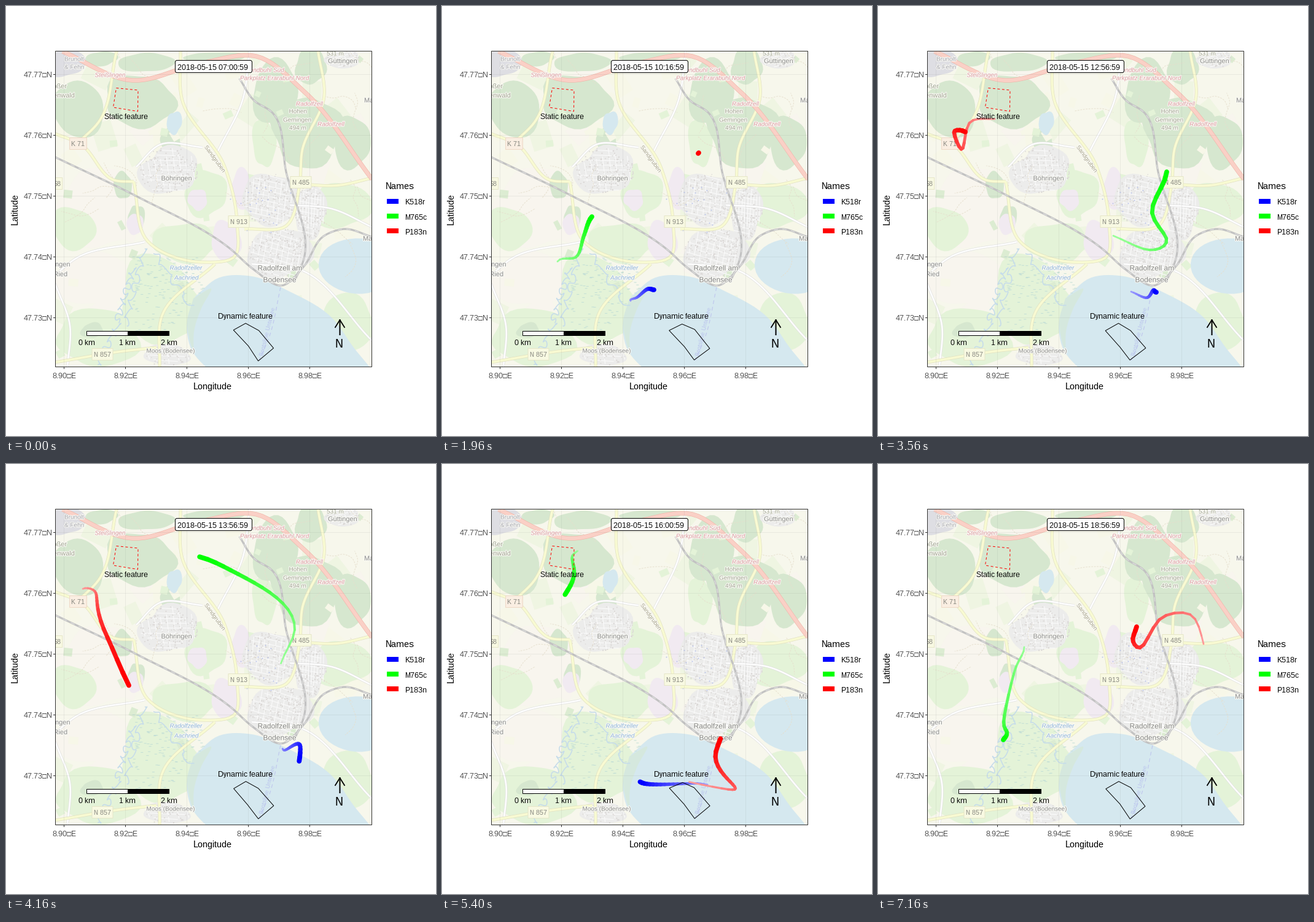
These frames come from a looping animation (700x700 px, 7200 ms). A matplotlib script:

```python
import numpy as np
import matplotlib.pyplot as plt
from matplotlib.animation import FuncAnimation
from matplotlib.collections import LineCollection, PolyCollection
from matplotlib.patches import FancyBboxPatch, Polygon, Rectangle
from matplotlib.patheffects import withStroke

FRAMES, STEP_MS, TAIL = 180, 40, 19
PT = 0.72  # points per pixel at 100 dpi
L, T, R, B = 80.5, 73.5, 595.5, 587.5
rng = np.random.default_rng(7)

plt.rcParams.update({"font.family": "Liberation Sans", "path.snap": False,
                     "text.hinting": "native", "text.hinting_factor": 1})
fig = plt.figure(figsize=(7, 7), dpi=100, facecolor="white")
chart = fig.add_axes([L / 700, 1 - B / 700, (R - L) / 700, (B - T) / 700],
                     xlim=(L, R), ylim=(B, T), xticks=[], yticks=[], facecolor="#f7f7ec")
ax = fig.add_axes([0, 0, 1, 1], xlim=(0, 700), ylim=(700, 0))
ax.axis("off")
for side in chart.spines.values():
    side.set_visible(False)


def hermite(t, p, s):
    """Smooth path through points p at times t, sampled at s."""
    m = np.gradient(p, t, axis=0)
    i = np.clip(np.searchsorted(t, s, "right") - 1, 0, len(t) - 2)
    h = (t[i + 1] - t[i])[:, None]
    u = (s - t[i])[:, None] / h
    v = 1 - u
    return v * v * ((1 + 2 * u) * p[i] + u * h * m[i]) + u * u * ((3 - 2 * u) * p[i + 1] - v * h * m[i + 1])


def curve(*flat):
    p = np.array(flat, float).reshape(-1, 2)
    t = np.r_[0, np.cumsum(np.hypot(*np.diff(p, axis=0).T))]
    return hermite(t, p, np.linspace(0, t[-1], 10 * len(p)))


areas, fills = [], []


def area(color, shape):
    areas.append(shape)
    fills.append(color)


def blob(color, cx, cy, rx, ry, rough=.12):
    a = np.linspace(0, 2 * np.pi, 40)
    r = 1 + sum(rough * rng.uniform(.3, 1) / k ** .5 * np.cos((k + 1) * a + rng.uniform(0, 6)) for k in (1, 2, 4))
    area(color, np.stack([cx + rx * r * np.cos(a), cy + ry * r * np.sin(a)], 1))


def lines(paths, color, width, z, **kw):
    chart.add_collection(LineCollection(paths, colors=color, linewidths=width * PT, zorder=z, **kw),
                         autolim=False)


def label(a, x, y, s, size=12, color="black", ha="center", **kw):
    return a.text(x, y + .36 * size, s, size=size * PT, color=color, ha=ha, va="baseline", **kw)


def place(x, y, s, size=11, color="#8c8c8c", angle=0, **kw):
    chart.text(x, y, s, size=size * PT, color=color, ha="center", va="center", rotation=angle,
               rotation_mode="anchor", clip_on=True, zorder=4,
               path_effects=[withStroke(linewidth=1.6, foreground="#fafaf5")], **kw)


FOREST, MEADOW, CREAM, PALE = "#d6e7cf", "#e4f3d8", "#f7f7e8", "#f8f5ee"
TOWN, WORKS, WATER, SCRUB = "#ececeb", "#f1eaf1", "#d5e8ef", "#dcecd2"


def parcels(n, colors, size):
    """Small tilted fields scattered over the land."""
    for _ in range(n):
        c, d = rng.uniform((L, T), (R, B)), rng.uniform(.4, 1, 2) * size
        a = rng.uniform(0, 1.5)
        u, v = d[0] * np.array([np.cos(a), np.sin(a)]), d[1] * np.array([-np.sin(a), np.cos(a)])
        area(colors[rng.integers(len(colors))], np.array([c + u + v, c + u - v, c - u - v, c - u + v]))


parcels(50, (CREAM, PALE, "#eff5e2"), 24)
blob(PALE, 150, 330, 65, 70)
blob(PALE, 145, 445, 60, 45)
for spot in [(110, 362, 36, 34), (250, 480, 65, 70), (150, 540, 70, 45), (325, 305, 36, 36),
             (290, 385, 55, 30), (545, 325, 48, 38), (420, 222, 18, 42), (555, 515, 45, 45)]:
    blob(MEADOW, *spot)
for spot in [(118, 168, 42, 46), (218, 155, 58, 42), (155, 86, 26, 12), (228, 92, 44, 16), (340, 84, 50, 9),
             (438, 140, 38, 50), (490, 205, 55, 60), (563, 222, 32, 40), (496, 98, 25, 30),
             (268, 220, 17, 20), (190, 292, 15, 22), (212, 345, 13, 22), (140, 528, 18, 12)]:
    blob(FOREST, *spot)
parcels(30, (CREAM, MEADOW, SCRUB), 9)
blob("#dedee3", 98, 92, 30, 24)
for spot in [(358, 382, 24, 32), (383, 298, 16, 32), (312, 315, 16, 17), (210, 355, 13, 18)]:
    blob(WORKS, *spot)
TOWNS = [(265, 268, 48, 38), (432, 315, 48, 42), (495, 335, 26, 44), (445, 402, 50, 42),
         (548, 86, 28, 16), (262, 568, 36, 18)]
for town in TOWNS:
    blob(TOWN, *town)

# Lakes, with reeds along the west shore
area(WATER, curve(308, 473, 345, 443, 400, 440, 460, 464, 530, 507, 566, 556, 600, 600,
                  340, 600, 300, 555, 295, 512, 308, 473))
area("#d5e8de", curve(305, 476, 334, 460, 318, 492, 306, 530, 305, 560, 295, 515, 305, 476))
blob(WATER, 572, 423, 63, 45, .02)
blob(WATER, 274, 190, 12, 19)
chart.add_collection(PolyCollection(areas, facecolors=fills, edgecolors="none", zorder=1), autolim=False)

# Side streets and houses
alleys, houses = [], []
for cx, cy, rx, ry in TOWNS:
    tilt = rng.uniform(-.4, .4)
    turn = np.array([[np.cos(tilt), np.sin(tilt)], [-np.sin(tilt), np.cos(tilt)]])
    for k in np.arange(-.9, .91, 8 / ry):
        w = np.sqrt(1 - k * k) * rng.uniform(.5, 1, 2)
        alleys += [np.array([[k * rx, -w[0] * ry], [k * rx + 4, w[1] * ry]]) @ turn + (cx, cy),
                   np.array([[-w[0] * rx, k * ry], [w[1] * rx, k * ry + 3]]) @ turn + (cx, cy)]
    n = int(rx * ry / 12)
    r, a = np.sqrt(rng.random(n)), rng.uniform(0, 2 * np.pi, n)
    houses.append(np.stack([cx + r * rx * np.cos(a), cy + r * ry * np.sin(a)], 1))
houses = np.vstack(houses)
lines(alleys, "#fafafa", 1.2, 1.2)
chart.scatter(*houses.T, s=rng.uniform(.8, 2.5, len(houses)), marker="s", c="#dbd8d6", lw=0, zorder=1.3)
chart.scatter(rng.normal(425, 28, 22), rng.normal(320, 24, 22), s=2, c="#b9c3ea", lw=0, zorder=1.4)

# Marsh ticks, creeks and footpaths
reeds = np.stack([rng.uniform(205, 325, 170), rng.uniform(408, 530, 170)], 1)
reeds = reeds[reeds.sum(1) < 790]
lines([[(x, y), (x + 4, y)] for x, y in reeds], "#c3dfd6", 1, 1.4)
u = np.linspace(0, 1, 90)
lines([np.stack([x + dx * u + 5 * np.sin(f * u), y + dy * u + 3 * np.cos(1.7 * f * u)], 1)
       for x, y, dx, dy, f in [(226, 392, -32, 128, 34), (208, 425, -28, 90, 40),
                               (184, 515, -36, 72, 28), (240, 400, 62, 90, 20)]], "#c6dcea", 1.6, 1.4)
paths = []
for _ in range(22):
    a = rng.uniform(0, 6.3) + np.cumsum(rng.normal(0, .5, 5))
    paths.append(curve(*(rng.uniform((L, T), (R, 400)) + 16 * np.cumsum(np.stack([np.cos(a), np.sin(a)], 1), 0)).ravel()))
lines(paths, "#e6dfcd", .9, 1.5, linestyles=(0, (3, 2)))

# Roads and railways
minor = [curve(80, 438, 112, 412, 226, 384), curve(80, 452, 104, 520, 100, 588),
         curve(396, 74, 386, 150, 345, 236), curve(320, 230, 250, 226, 212, 262),
         curve(462, 324, 530, 330, 596, 360), curve(400, 420, 475, 428, 596, 545)]
major = [curve(284, 74, 286, 150, 356, 262, 376, 352, 372, 408, 320, 417, 230, 382, 208, 286),
         curve(80, 208, 120, 224, 178, 284, 208, 286), curve(118, 222, 150, 190, 180, 74),
         curve(340, 420, 254, 504, 250, 588),
         curve(388, 363, 456, 358, 478, 290, 482, 236, 518, 146, 508, 74),
         curve(80, 580, 190, 562, 245, 556), curve(596, 280, 540, 292, 478, 290)]
motorway = [curve(92, 74, 205, 121, 318, 93, 408, 82, 486, 140, 596, 282)]
for roads, edge, fill, w, z in [(minor, "#dedede", "#fefefe", 2.6, 2), (major, "#e0dfbf", "#f8fad2", 3.8, 2.1),
                                (motorway, "#efb5a8", "#fad0c6", 6, 2.2)]:
    lines(roads, edge, w + 1.2, z)
    lines(roads, fill, w, z)
rails = [curve(80, 246, 215, 311, 366, 396, 402, 428, 450, 455, 484, 425, 518, 374, 550, 363, 596, 376),
         curve(380, 118, 404, 154, 432, 172, 456, 270, 484, 415, 470, 447)]
lines(rails, "#c2c2c2", 3.2, 2.3)
lines(rails, "#dcdcdc", 1.4, 2.4, linestyles=(0, (5, 5)))
lines([curve(447, 458, 428, 540, 412, 577)], "#c0c8ee", 1.2, 2.5, linestyles=(0, (5, 4)))

# Place names
PINK, BLUE, HILL = "#dc9aa0", "#8fb4da", "#a2a593"
for x, y, s, size, color in [
        (112, 87, "Brunolt", 10, "#a3a3ad"), (112, 100, "& Fehn", 10, "#a3a3ad"),
        (88, 131, "oßer", 11, HILL), (95, 146, "enwald", 11, HILL), (476, 172, "Hohen", 10, HILL),
        (476, 186, "Gemingen", 10, HILL), (476, 199, "494 m", 10, HILL), (537, 78, "531 m", 10, HILL),
        (547, 90, "Güttingen", 11, "#8c8c8c"), (277, 281, "Böhringen", 11, "#8c8c8c"),
        (92, 421, "ngen", 11, "#8c8c8c"), (88, 437, "Ried", 11, "#8c8c8c"),
        (592, 154, "Mar", 11, "#8c8c8c"), (590, 379, "Mar", 11, "#8c8c8c"),
        (269, 562, "Moos (Bodensee)", 10, "#8c8c8c"),
        (447, 427, "Radolfzell am", 12, "#858585"), (447, 446, "Bodensee", 12, "#858585")]:
    place(x, y, s, size, color)
for x, y, s, color in [
        (172, 113, "Steißlingen", PINK), (424, 105, "ßendbuhl Süd", PINK),
        (440, 118, "Parkplatz Erarabuhl Nord", PINK), (496, 160, "Radolfzell", PINK),
        (531, 193, "Radolfzell", PINK), (295, 427, "Radolfzeller", BLUE), (295, 443, "Aachried", BLUE)]:
    place(x, y, s, 10, color, style="italic")
place(339, 248, "Sandgruben", 9.5, "#a8a48c", -54)
chart.text(426, 530, "Bootslinie Untersee", size=9.5 * PT, color="#b9c3ee", rotation=76,
           ha="center", va="center", rotation_mode="anchor", zorder=4)
for x, y, s, fill, edge in [(117.5, 224, "K 71", "#faeee2", "#eed9c6"), (480, 287, "N 485", "#f8f9e2", "#e6e6c8"),
                            (379, 351, "N 913", "#f8f9e2", "#e6e6c8"), (157, 567, "N 857", "#f8f9e2", "#e6e6c8"),
                            (84, 289, "58", "#f8f9e2", "#e6e6c8")]:
    w = 6.2 * len(s) + 3
    chart.add_patch(Rectangle((x - w / 2, y - 9.5), w, 19, fc=fill, ec=edge, lw=PT, zorder=4))
    label(chart, x, y, s, 11, "#8a8a82", zorder=4.1, clip_on=True)

# Frame, grid, ticks and titles
ax.add_patch(Rectangle((L, T), R - L, B - T, fill=False, ec="#333333", lw=PT))
for i in range(5):
    x, y = np.floor(94 + 100.2 * i) + .5, np.floor(507 - 99 * i) + .5
    lines([[(x, T), (x, B)], [(L, y), (R, y)]], (.4, .4, .4, .09), 1, 3)
    ax.plot([x, x], [B, B + 3], color="#333333", lw=PT)
    ax.plot([L - 3, L], [y, y], color="#333333", lw=PT)
    label(ax, x, 601.5, f"{8.9 + .02 * i:.2f}\u25a1E", 12, "#4d4d4d")
    label(ax, 76, y + .5, f"{47.73 + .01 * i:.2f}\u25a1N", 12, "#4d4d4d", "right")
label(ax, 336.5, 619, "Longitude", 15)
ax.text(15, 330.5, "Latitude", size=15 * PT, rotation=90, ha="center", va="center")

label(ax, 618, 293, "Names", 15, ha="left")
for i, (name, color) in enumerate([("K518r", "blue"), ("M765c", "lime"), ("P183n", "red")]):
    ax.add_patch(Rectangle((620, 314 + 24 * i), 19, 8, fc=color, lw=0))
    label(ax, 649, 319 + 24.5 * i, name, ha="left")

# Scale bar, north arrow and features
for x, fill in [(131.5, "white"), (198.5, "black")]:
    ax.add_patch(Rectangle((x, 529.5), 67, 7, fc=fill, ec="black", lw=PT))
for i in range(3):
    label(ax, 131 + 67 * i, 547.5, f"{i} km")
ax.plot([543.5, 543.5], [535, 511], color="black", lw=2 * PT)
ax.plot([536, 543.5, 551], [523, 511, 523], color="black", lw=1.8 * PT)
label(ax, 542.5, 549, "N", 20)
ax.add_patch(Polygon([(179.5, 133.5), (215, 137), (214.5, 171.5), (174.5, 165)], fill=False,
                     ec="red", lw=PT, ls=(0, (4, 3.5))))
label(ax, 195.5, 180, "Static feature")
label(ax, 389.5, 505, "Dynamic feature")
ZONE = np.array([(370, 528), (391, 517.5), (411, 527.5), (435.3, 556.5), (410.5, 577), (394, 554.5)])
zone = ax.add_patch(Polygon(ZONE, fill=False, ec="black", lw=PT))
ax.add_patch(FancyBboxPatch((278.5, 91.5), 119, 14, boxstyle="round,pad=3,rounding_size=3",
                            fc="white", ec="black", lw=PT))
clock = label(ax, 279, 99.5, "", ha="left")


def track(legs):
    """Each leg spreads its points evenly over one tail length from its first frame."""
    t = np.concatenate([np.linspace(f, f + TAIL, len(p)) for f, p in legs.items()])
    n = np.arange(t[0], t[-1] + 1)
    return int(t[0]), hermite(t, np.array([q for p in legs.values() for q in p], float), n)


blue = track({
    0: [(304, 482)],
    8: [(301, 486), (314, 482), (311, 490), (314, 486)],
    30: [(307, 480), (318, 474), (334, 461), (345, 462)],
    70: [(412, 465), (437, 475), (448, 463), (453, 466)],
    100: [(479, 460), (473, 498), (448, 521), (416, 520)],
    133: [(329, 520), (312, 512), (299, 516), (296, 521)]})
green = track({
    0: [(190, 460)],
    8: [(187, 453), (177, 444), (184, 440), (182, 434)],
    30: [(188, 416), (219, 408), (231, 374), (244, 343)],
    70: [(383, 374), (440, 397), (470, 382), (446, 334), (470, 270)],
    100: [(366, 173), (305, 149), (236, 153), (225, 141), (214, 147)],
    133: [(209, 198), (180, 243), (173, 249), (182, 263)],
    160: [(238, 298), (222, 338), (205, 415), (210, 438), (204, 449)]})
red = track({
    48: [(418, 239)],
    49: [(417, 240)],
    70: [(190, 184), (150, 189), (137, 233), (124, 205), (142, 205)],
    100: [(165, 282), (228, 406), (335, 494), (455, 528)],
    133: [(446, 468), (461, 420), (444, 404), (482, 393), (519, 384)],
    160: [(530, 293), (510, 246), (462, 250), (430, 297), (415, 288), (421, 265)]})

movers = []
for z, (start, path), rgb in zip((5, 5.1, 5.2), (blue, green, red), np.eye(3)[[2, 1, 0]]):
    tail = LineCollection([], capstyle="round", zorder=z)
    chart.add_collection(tail, autolim=False)
    movers.append((start, path, rgb, tail))


def update(n):
    minutes = 7 * 60 + 4 * n
    clock.set_text(f"2018-05-15 {minutes // 60:02d}:{minutes % 60:02d}:59")
    zone.set_xy(ZONE + np.random.default_rng(n).uniform(-1, 1, ZONE.shape))
    for start, path, rgb, tail in movers:
        k = np.arange(max(start, n - TAIL), min(start + len(path) - 1, n))
        fade = 1 - (n - 1 - k) / (TAIL - 1)
        ink = (.4 + .6 * fade)[:, None]
        tail.set_segments([path[i - start:i - start + 2] for i in k])
        tail.set_linewidths((2.8 + 5 * fade) * PT)
        tail.set_color(1 - ink * (1 - rgb))
    return [clock, zone] + [m[3] for m in movers]


anim = FuncAnimation(fig, update, frames=FRAMES, interval=STEP_MS, repeat=True, repeat_delay=0)
plt.show()
```
